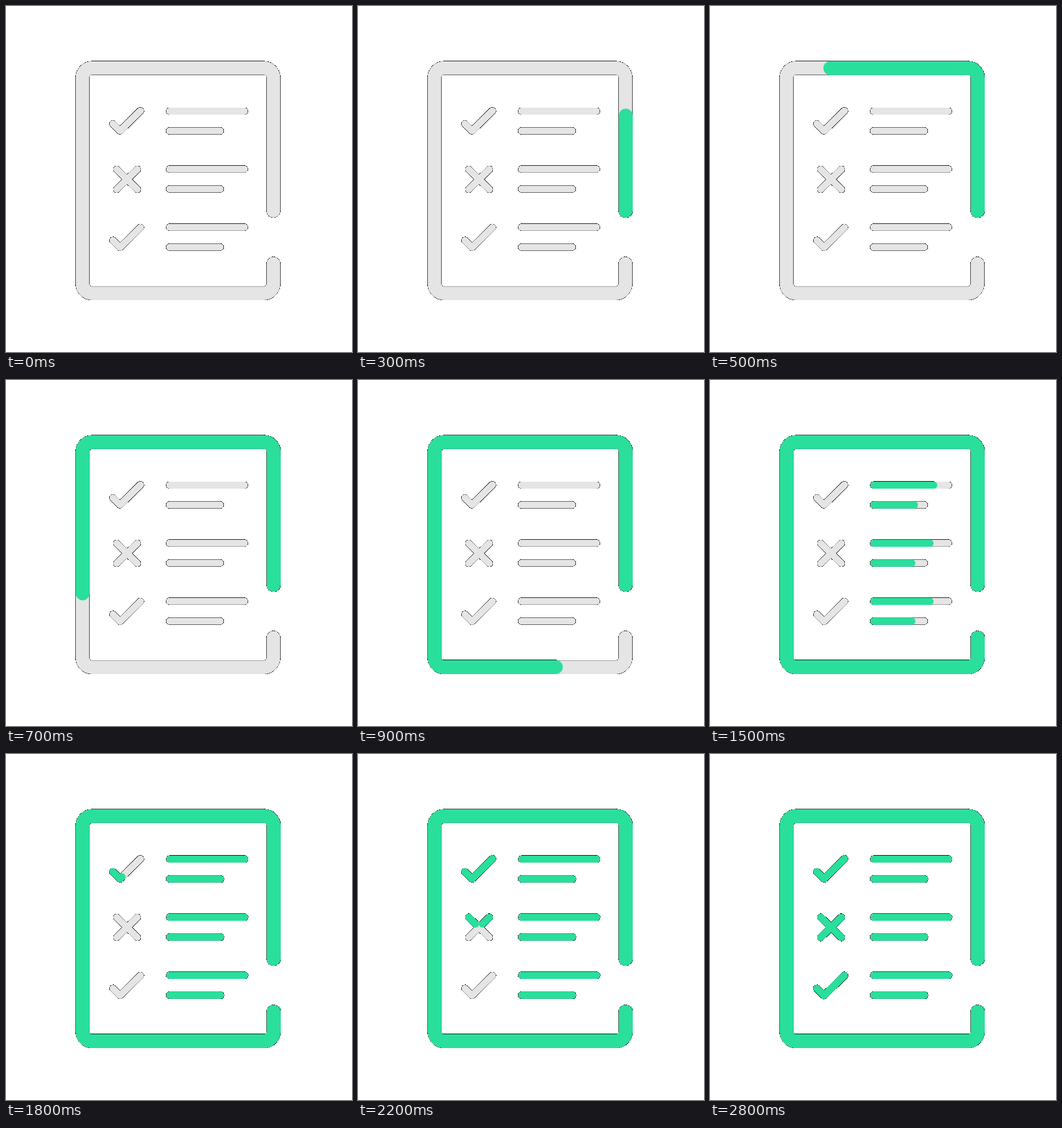
Write an HTML page with a canvas that moves like this. It is 500 px wide and 500 px high and loops after 3100 ms.

```html
<!DOCTYPE html>
<html lang="en">
<head>
<meta charset="utf-8">
<title>Checklist</title>
<style>
  html, body { margin: 0; width: 100%; height: 100%; overflow: hidden; background: #fff; }
  canvas { display: block; width: 500px; height: 500px; }
</style>
</head>
<body>
<canvas id="stage" width="500" height="500"></canvas>
<script>
const SIZE = 500, LOOP = 3100, STEP = 100;
const GREY = '#e5e5e5', GREEN = '#2adf9b';
const ctx = document.getElementById('stage').getContext('2d', { willReadFrequently: true });
ctx.lineCap = ctx.lineJoin = 'round';

// Open frame: starts at the lower right gap and runs counter-clockwise.
function frame(left, right, top, bottom) {
  const r = 14, arc = (x, y) => `A${r} ${r} 0 0 0 ${x} ${y}`;
  return `M${right} 296V${top + r}${arc(right - r, top)}H${left + r}${arc(left, top + r)}` +
    `V${bottom - r}${arc(left + r, bottom)}H${right - r}${arc(right, bottom - r)}V372.5`;
}

const bar = (y, end, dx) => `M${236.5 + dx} ${y}H${end + dx}`;

function pathLength(d) {
  const path = document.createElementNS('http://www.w3.org/2000/svg', 'path');
  path.setAttribute('d', d);
  return path.getTotalLength();
}

const parts = [];
// start: step of the first visible change, count: steps until full
function add(base, fill, width, start, count) {
  parts.push({
    base: new Path2D(base), fill: new Path2D(fill), length: pathLength(fill),
    width, start, count
  });
}

add(frame(110.5, 386.5, 89.6, 415.2), frame(110.8, 386.9, 89.8, 414.9), 19.8, 3, 8);

for (let row = 0; row < 3; row++) {
  const y = 151.9 + 83.95 * row;
  const timing = row ? [13, 4] : [12, 5];
  add(bar(y, 344.5, 0), bar(y, 344.5, 0.5), 10, ...timing);
  add(bar(y + 28.7, 309.5, 0), bar(y + 28.7, 309.5, 0.5), 10, ...timing);
}

const marks = [
  ['M154.5 170.2l10.3 10.2l29.5 -29', 18],
  ['M160 236L189.8 265', 22],
  ['M189.8 236L160 265', 22],
  ['M154.5 338.8l10.3 10.2l29.5 -29', 26]
];
for (const [d, start] of marks) add(d, d, 10, start, 3);

function stroke(path, color, width) {
  ctx.strokeStyle = color;
  ctx.lineWidth = width;
  ctx.stroke(path);
}

// Partly covered edge pixels fade to black and become opaque: a hard hairline.
function hardenEdges() {
  const image = ctx.getImageData(0, 0, SIZE, SIZE), px = image.data;
  for (let i = 0; i < px.length; i += 4) {
    const alpha = px[i + 3];
    if (alpha === 0 || alpha === 255) continue;
    for (let c = 0; c < 3; c++) px[i + c] *= alpha / 255;
    px[i + 3] = alpha > 20 ? 255 : 0;
  }
  ctx.putImageData(image, 0, 0);
}

function draw(step) {
  ctx.clearRect(0, 0, SIZE, SIZE);
  ctx.setLineDash([]);
  for (const p of parts) stroke(p.base, GREY, p.width);
  for (const p of parts) {
    const done = Math.min(1, (step - p.start + 1) / p.count);
    if (done <= 0) continue;
    ctx.setLineDash(done < 1 ? [p.length * done, p.length * 2] : []);
    stroke(p.fill, GREEN, p.width + 0.3);
  }
  hardenEdges();
}

let shown = -1;
function render(time) {
  const step = Math.floor((time % LOOP) / STEP);
  if (step !== shown) draw(shown = step);
  requestAnimationFrame(render);
}
render(0);
</script>
</body>
</html>
```
